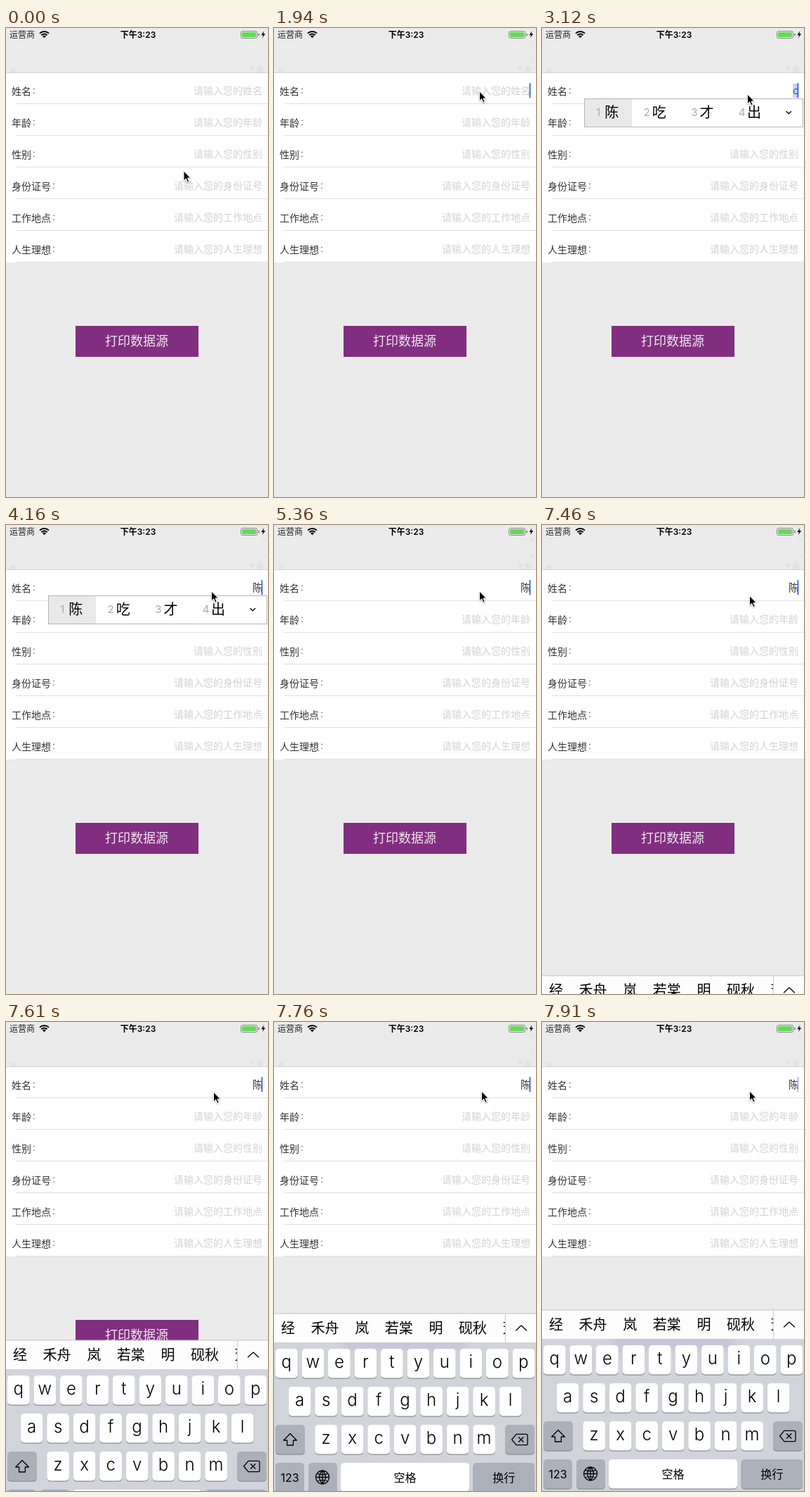
An HTML page that plays this animation: 373x666 px, repeating every 8000 ms.

```html
<!DOCTYPE html>
<html lang="zh-CN">
<head>
<meta charset="utf-8">
<title>表单</title>
<style>
html, body { margin: 0; width: 100%; height: 100%; overflow: hidden; background: #ebebeb; }
svg { display: block; width: 373px; height: 666px; }
text { font-family: Inter, "Noto Sans CJK SC", "Noto Sans CJK", sans-serif; white-space: pre; }
.light { font-weight: 300; }
.mid { text-anchor: middle; }
.end { text-anchor: end; }
.line { fill: none; stroke: #000; stroke-width: 1.3; stroke-linejoin: round; stroke-linecap: round; }
</style>
</head>
<body>
<svg viewBox="0 0 373 666" xmlns="http://www.w3.org/2000/svg">
  <defs>
    <filter id="soft" x="-20%" y="-60%" width="140%" height="220%"><feGaussianBlur stdDeviation="6"/></filter>
    <filter id="shade" x="-40%" y="-30%" width="200%" height="180%">
      <feDropShadow dx="0" dy="1" stdDeviation="1" flood-opacity=".35"/>
    </filter>
    <clipPath id="keyArea"><rect y="41" width="373" height="220"/></clipPath>
    <clipPath id="words"><rect width="329" height="41"/></clipPath>
  </defs>
  <rect width="373" height="666" fill="#ebebeb"/>
  <g fill="#e3e3e3">
    <circle cx="10" cy="61" r="4"/><circle cx="351" cy="57" r="3"/><circle cx="362" cy="59" r="5"/>
    <circle cx="368" cy="21" r="2"/><circle cx="368" cy="44" r="2"/>
  </g>

  <g id="status">
    <text x="5" y="13.6" font-size="12" fill="#222">运营商</text>
    <g fill="none" stroke="#000" stroke-width="2">
      <path d="M48 7.6A9.3 9.3 0 0 1 61 7.6"/>
      <path d="M50.4 10.2A5.8 5.8 0 0 1 58.6 10.2"/>
    </g>
    <path d="M54.5 14.2L52 11.7A3.5 3.5 0 0 1 57 11.7Z"/>
    <text class="mid" x="188" y="13.6" font-size="12" font-weight="600">下午3:23</text>
    <rect x="334.5" y="4.5" width="23" height="10" rx="2" fill="none" stroke="#888"/>
    <rect x="336" y="6" width="20" height="7" rx=".6" fill="#65d85c"/>
    <path d="M359 7.5a2 2 0 0 1 0 4z" fill="#888"/>
    <path d="M367.3 4.2L363.4 9.9H366L364.8 14L369.2 8.2H366.4Z"/>
  </g>

  <g id="form">
    <rect y="64" width="373" height="269" fill="#fff"/>
    <rect y="63" width="373" height="1" fill="#d4d4d6"/>
  </g>
  <rect x="99" y="423" width="175" height="44" fill="#822e80"/>
  <text class="light mid" x="186" y="451.4" font-size="18" fill="#fff" opacity=".88">打印数据源</text>

  <rect id="mark" x="357" y="79" width="8" height="20" fill="#c2d7ee"/>
  <text id="entry" class="end light" x="365" y="94" font-size="14" fill="#333"></text>
  <rect id="caret" x="363.4" y="78" width="2" height="21.5" rx="1" fill="#436be0"/>

  <g id="picker">
    <rect x="60.5" y="100.5" width="311" height="40" fill="#fff" stroke="#b4b4b4"/>
    <rect x="61" y="101" width="67" height="39" fill="#e9e9e9"/>
    <path class="line" d="M348 118.5L351.3 121.8L354.6 118.5"/>
  </g>

  <g id="board">
    <rect width="373" height="261" fill="#d1d4da"/>
    <g clip-path="url(#keyArea)">
      <rect id="glow" x="99" width="175" height="44" fill="#a040c0" opacity=".1" filter="url(#soft)"/>
    </g>
    <rect width="373" height="41" fill="#fdfdfe"/>
    <rect y="-.5" width="373" height="1" fill="#c3c5c9"/>
    <g id="hints" clip-path="url(#words)"></g>
    <rect x="329" width="1" height="41" fill="#c9cbcf"/>
    <path class="line" d="M344.5 24L352 17L359.5 24"/>
    <g id="keys"></g>
    <path class="line" d="M23 170.5L32.3 180H27.4V187H18.6V180H13.7Z"/>
    <path class="line" d="M345 171.3H359Q361 171.3 361 173.3V184.7Q361 186.7 359 186.7H345L338.5 179ZM348.5 175.8L354.9 182.2M354.9 175.8L348.5 182.2"/>
    <path class="line" d="M59.5 232.5a9.5 9.5 0 0 1 19 0a9.5 9.5 0 0 1 -19 0H78.5M69 223V242M69 223q-9 9.5 0 19q9 -9.5 0 -19M61.5 227.3Q69 230 76.5 227.3M61.5 237.7Q69 235 76.5 237.7"/>
  </g>

  <path id="mouse" d="M.3 0V13.8L3.5 10.8L5.8 16.2L8 15.2L5.8 10H10Z" stroke="#fff" stroke-width="1" filter="url(#shade)"/>
</svg>
<script>
const LOOP = 8000, BEAT = 149;
const TAP = 1930, TYPE = 2980, PICK = 4020, STEADY = 4440, RISE = 7418;
const $ = id => document.getElementById(id);
const set = (id, name, value) => $(id).setAttribute(name, value);
const clamp = v => Math.min(1, Math.max(0, v));
const ramp = (t, a, b) => clamp((t - a) / (b - a));

function add(parent, tag, attrs, content = '') {
  const el = document.createElementNS('http://www.w3.org/2000/svg', tag);
  for (const k in attrs) el.setAttribute(k, attrs[k]);
  el.textContent = content;
  return $(parent).appendChild(el);
}

const fields = ['姓名', '年龄', '性别', '身份证号', '工作地点', '人生理想'];
const prompts = fields.map((name, i) => {
  const y = 64 + i * 45, label = { class: 'light', 'font-size': 14, fill: '#333' };
  add('form', 'text', { ...label, x: 8, y: y + 30.7 }, name);
  add('form', 'text', { ...label, x: 10 + name.length * 14, y: y + 29 }, ':');
  add('form', 'rect', { x: 14, y: y + 43, width: 359, height: 1, fill: '#e0e0e2' });
  return add('form', 'text', { class: 'light end', x: 365, y: y + 30, 'font-size': 14, fill: '#d2d2d6' }, '请输入您的' + name);
});

[...'陈吃才出'].forEach((ch, i) => {
  const x = 77 + i * 67.6;
  add('picker', 'text', { x, y: 125, 'font-size': 15, fill: '#aaa' }, i + 1);
  add('picker', 'text', { x: x + 12.2, y: 127, 'font-size': 20 }, ch);
});

let hintX = 10;
for (const word of ['经', '禾舟', '岚', '若棠', '明', '砚秋', '芳']) {
  add('hints', 'text', { x: hintX, y: 28.3, 'font-size': 20 }, word);
  hintX += word.length * 20 + 22.6;
}

function key(x, row, w, label, { size = 16, dark = false } = {}) {
  const y = 50 + row * 54, box = { x, width: w, height: 41.5, rx: 5 };
  add('keys', 'rect', { ...box, y: y + 1.2, fill: '#8b8e94' });
  add('keys', 'rect', { ...box, y, fill: dark ? '#abb0bb' : '#fff' });
  add('keys', 'text', { class: size > 20 ? 'mid light' : 'mid', x: x + w / 2, y: y + 27, 'font-size': size }, label);
}
['qwertyuiop', 'asdfghjkl', 'zxcvbnm'].forEach((letters, row) => {
  const left = 189.5 - letters.length * 18.75;
  [...letters].forEach((ch, i) => key(left + i * 37.5, row, 31.7, ch, { size: 24 }));
});
const dark = { dark: true };
key(2, 2, 42, '', dark);
key(329, 2, 42, '', dark);
key(2, 3, 41, '123', dark);
key(49, 3, 41, '', dark);
key(95, 3, 183, '空格');
key(283.5, 3, 87.5, '换行', dark);

// Each glide eases the pointer by dx, dy between two times.
const glides = [
  { from: 150, to: 890, dx: 39.5, dy: -119 },
  { from: 1740, to: 2090, dx: 0, dy: 10 },
  { from: 6700, to: 7150, dx: 3, dy: 8 },
  { from: 7150, to: 7900, dx: 0, dy: -4 }
];
function pointer(t) {
  let x = 252.7, y = 203;
  for (const g of glides) {
    const p = ramp(t, g.from, g.to), e = p * p * (3 - 2 * p);
    x += g.dx * e;
    y += g.dy * e;
  }
  return `translate(${x} ${y})`;
}

const blink = age => clamp(.5 + 1.5 * (Math.cos((age - 150) / 1000 * 2 * Math.PI) + .31));
function caret(t) {
  if (t < TAP) return 0;
  if (t < TYPE) return blink(t - TAP);
  return t < STEADY ? 1 : blink(t - STEADY);
}

function boardTop(t) {
  const s = Math.max(0, t - RISE) * .018;
  return Math.round(409 + 261 * (1 + s) * Math.exp(-s));
}

function draw(t) {
  const entry = t < TYPE ? '' : t < PICK ? 'c' : '陈', top = boardTop(t);
  set('mouse', 'transform', pointer(t));
  set('caret', 'opacity', caret(t));
  set('picker', 'opacity', ramp(t, TYPE, TYPE + BEAT) * (1 - ramp(t, PICK, PICK + 2 * BEAT)));
  set('mark', 'opacity', entry === 'c' ? 1 : 0);
  $('entry').textContent = entry;
  prompts[0].setAttribute('opacity', entry ? 0 : 1);
  set('board', 'transform', `translate(0 ${top})`);
  set('glow', 'y', 423 - top);
}

const start = performance.now();
function tick() {
  const t = (performance.now() - start) % LOOP;
  // The picture advances in even beats; the small lead absorbs rounding.
  draw(Math.floor((t + 10) / BEAT) * BEAT);
  requestAnimationFrame(tick);
}
tick();
</script>
</body>
</html>
```
